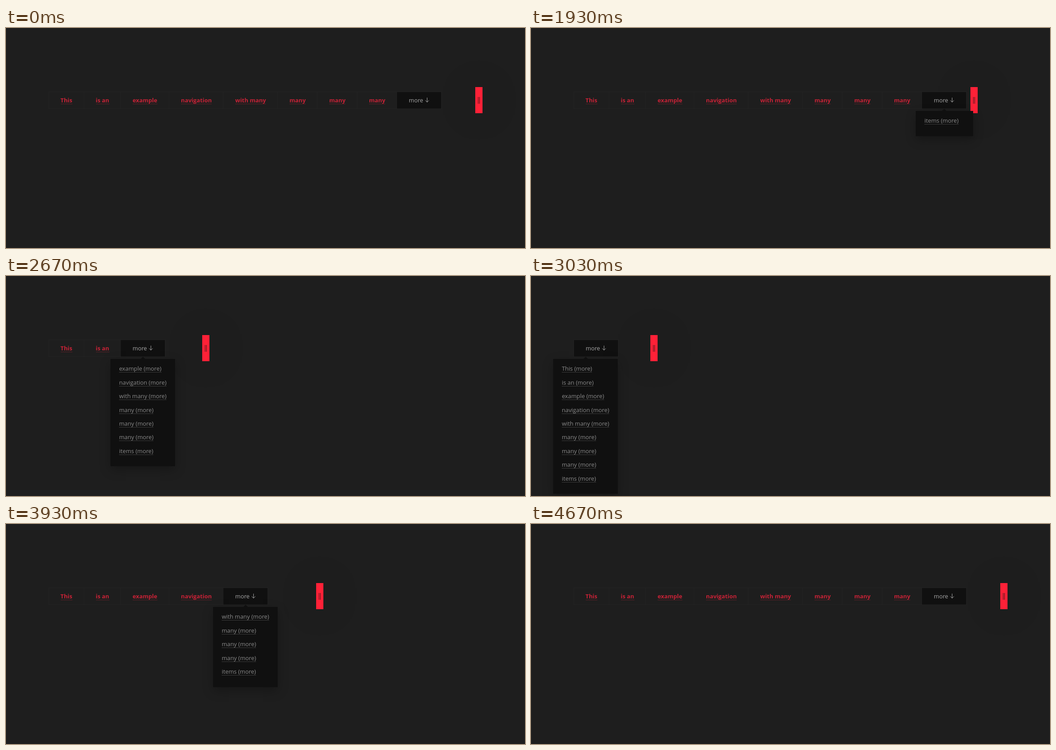
An HTML page with a canvas that plays this animation: 1148 px wide and 488 px high, repeating every 6410 ms.

```html
<!DOCTYPE html>
<html lang="en">
<head>
<meta charset="utf-8">
<title>Responsive navigation</title>
<style>
  html, body { margin: 0; height: 100%; overflow: hidden; background: #1e1e1e; }
  canvas { display: block; }
</style>
</head>
<body>
<canvas id="stage" width="1148" height="488"></canvas>
<script>
const ctx = document.getElementById('stage').getContext('2d');
const LOOP = 6410, OPEN = 1430, CLOSE = 4670;
const FAMILY = '"Open Sans", sans-serif';
const BOLD = '700 12.8px ' + FAMILY, REGULAR = '400 12.8px ' + FAMILY;
const PAD = 26, MORE_W = 98, ROW = 30.4;

const labels = ['This', 'is an', 'example', 'navigation', 'with many', 'many', 'many', 'many', 'items'];
// Text start of each cell; the last one is the place of "more"
const textX = [120.5, 198.5, 280, 387, 507, 627, 715, 803, 891];

// Handle position over time: [ms, left edge]
const path = [[1400, 1038], [1750, 1010], [2070, 915], [2330, 711], [2670, 435], [2730, 392],
  [3100, 256], [3430, 326], [3930, 685], [4070, 798], [4360, 980], [4670, 1038]];

function slope(i) {
  if (i === 0 || i === path.length - 1) return 0;
  const [[t0, x0], [t1, x1], [t2, x2]] = path.slice(i - 1, i + 2);
  const a = t1 - t0, b = t2 - t1;
  return ((x1 - x0) / a * b + (x2 - x1) / b * a) / (a + b);
}

function handleX(t) {
  const i = path.findIndex(p => p[0] > t) - 1;
  if (i < 0) return 1038;
  const [t0, x0] = path[i], [t1, x1] = path[i + 1];
  const h = t1 - t0, u = (t - t0) / h, v = 1 - u;
  return v * v * (1 + 2 * u) * x0 + u * u * (3 - 2 * u) * x1
    + h * u * v * (v * slope(i) - u * slope(i + 1));
}

function rect(x, y, w, h, color) {
  ctx.fillStyle = color;
  ctx.fillRect(x, y, w, h);
}

function shadowed(blur, dy, alpha, draw) {
  ctx.save();
  ctx.shadowColor = `rgba(0,0,0,${alpha})`;
  ctx.shadowBlur = blur;
  ctx.shadowOffsetY = dy;
  draw();
  ctx.restore();
}

function text(str, x, y, font, color, line) {
  ctx.font = font;
  ctx.fillStyle = color;
  ctx.fillText(str, x, y);
  if (line) rect(Math.round(x), Math.round(y + 3), Math.round(ctx.measureText(str).width), 1, line);
}

function drawHandle(x) {
  shadowed(80, 0, 0.25, () => rect(x, 131, 16, 58, '#ff2137'));
  rect(x + 6, 153, 1, 15, '#3a1519');
  rect(x + 9, 153, 1, 15, '#3a1519');
}

function drawNav(count) {
  const left = Math.round(textX[count] - PAD);
  ctx.strokeStyle = '#232323';
  ctx.lineWidth = 1;
  ctx.strokeRect(94.5, 141.5, left + MORE_W - 94, 37);
  for (let i = 0; i < count; i++) {
    if (i) rect(Math.round(textX[i] - PAD) - 1, 142, 1, 37, '#232323');
    text(labels[i], textX[i], 165, BOLD, '#c72236', '#5c2028');
  }
  rect(left, 142, MORE_W - 0.5, 36.5, '#101010');
  const x = left + PAD;
  text('more', x, 165, REGULAR, '#a6a6a6');
  ctx.strokeStyle = '#a6a6a6';
  ctx.beginPath();
  ctx.moveTo(x + 40.5, 154.5);
  ctx.lineTo(x + 40.5, 164.5);
  ctx.moveTo(x + 36.5, 160.5);
  ctx.lineTo(x + 40.5, 164.5);
  ctx.lineTo(x + 44.5, 160.5);
  ctx.stroke();
}

function drawMenu(count) {
  const rows = labels.slice(count).map(s => s + ' (more)');
  ctx.font = REGULAR;
  const w = Math.max(126.5, 38.4 + Math.max(...rows.map(s => ctx.measureText(s).width)));
  // With no cells left the menu hangs from the button's left padding
  const mid = count ? textX[count] - PAD + MORE_W / 2 : 121;
  const left = Math.round(mid - w / 2);
  shadowed(22, 8, 0.25, () => rect(left, 184, Math.round(w), Math.round(25.5 + ROW * rows.length), '#101010'));
  ctx.fillStyle = '#101010';
  ctx.beginPath();
  ctx.moveTo(mid - 5, 184);
  ctx.lineTo(mid, 179);
  ctx.lineTo(mid + 5, 184);
  ctx.fill();
  rows.forEach((s, i) => text(s, left + 19.2, Math.round(210.3 + ROW * i), REGULAR, '#8a8a8a', '#3c3c3c'));
}

function frame(now) {
  const t = now % LOOP;
  const x = Math.round(handleX(t));
  let count = textX.length - 1;
  while (count > 0 && textX[count] - PAD + MORE_W > x) count--;
  rect(0, 0, 1148, 488, '#1e1e1e');
  drawHandle(x);
  drawNav(count);
  if (t >= OPEN && t < CLOSE) drawMenu(count);
  requestAnimationFrame(frame);
}
requestAnimationFrame(frame);
</script>
</body>
</html>
```
